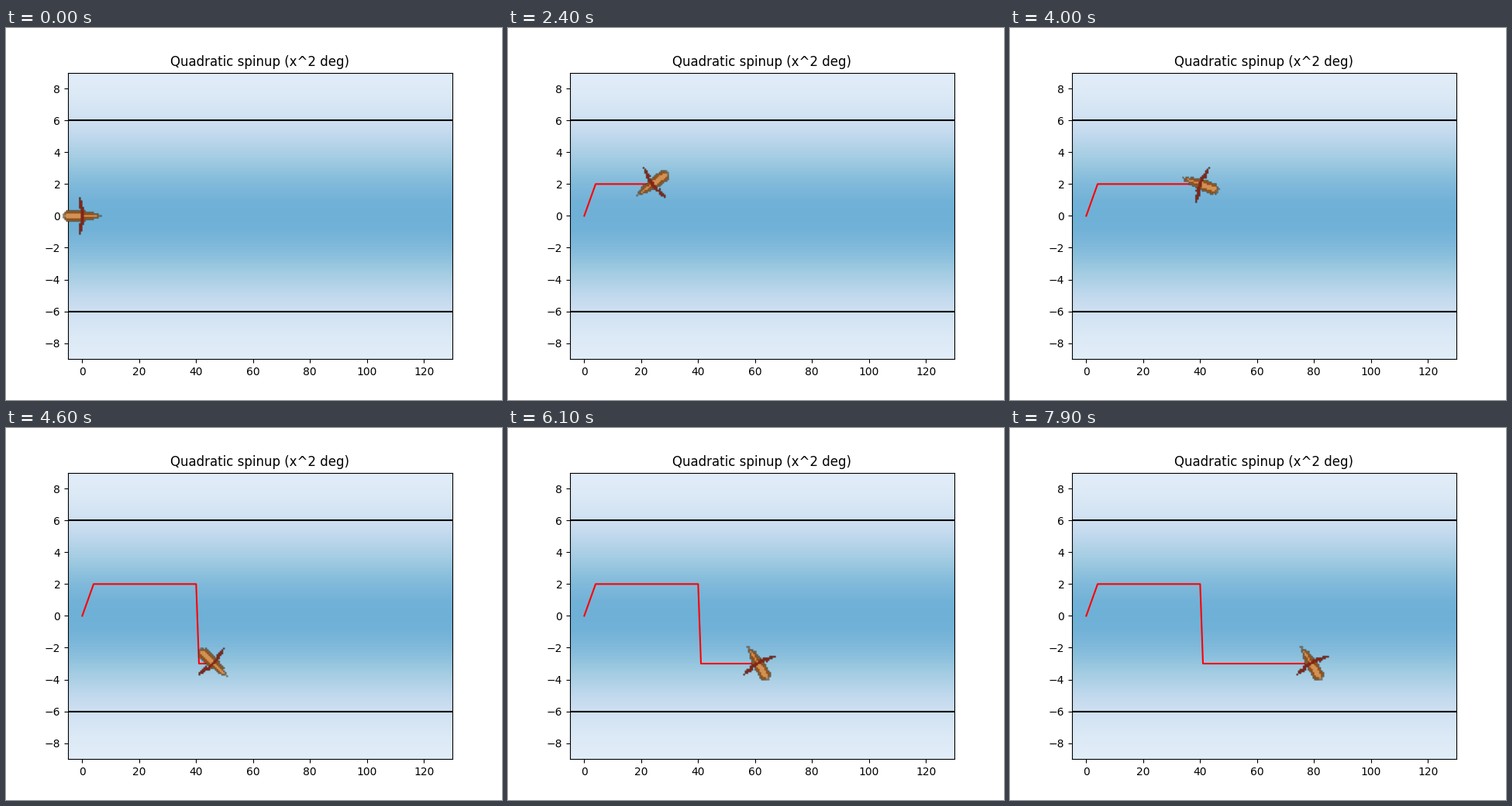
Write a matplotlib script that moves like this. It is 640 by 480 pixels and loops after 8000 ms.

```python
import numpy as np
import matplotlib.pyplot as plt
from matplotlib.animation import FuncAnimation
from matplotlib.offsetbox import AnnotationBbox, OffsetImage

FRAMES, STEP_MS = 80, 100
EDGE = (124, 92, 56)
PLANK = (146, 78, 26)
DECK = (210, 146, 84)
OAR = (128, 38, 24)


def make_boat():
    """Small pixel boat seen from above, bow to the right."""
    img = np.zeros((23, 24, 4))
    mid = 11

    def block(c0, c1, r0, r1, color, alpha=1.0):
        """Fill columns c0..c1 at distances r0..r1 either side of the keel."""
        for r in range(r0, r1 + 1):
            for row in (mid - r, mid + r):
                img[row, c0:c1 + 1, :3] = np.array(color) / 255
                img[row, c0:c1 + 1, 3] = alpha

    # hull outline
    block(0, 0, 0, 1, EDGE, 0.8)
    block(1, 1, 0, 2, EDGE)
    block(2, 13, 0, 3, EDGE)
    block(14, 18, 0, 2, EDGE)
    block(19, 21, 0, 1, EDGE)
    block(22, 23, 0, 0, EDGE, 0.8)
    # planks and deck
    block(1, 1, 0, 0, DECK)
    block(2, 13, 0, 2, PLANK)
    block(2, 10, 0, 1, DECK)
    block(14, 18, 0, 1, PLANK)
    block(13, 20, 0, 0, DECK)
    block(21, 21, 0, 0, PLANK)
    # oars
    block(10, 10, 5, 11, OAR)
    block(11, 11, 2, 9, OAR)
    block(11, 12, 0, 5, OAR)
    return img


def rotate(img, deg, shape=(31, 30)):
    """Nearest-neighbour turn, counter-clockwise, onto a larger canvas."""
    h, w = img.shape[:2]
    rows, cols = np.indices(shape)
    y = (shape[0] - 1) / 2 - rows
    x = cols - (shape[1] - 1) / 2
    c, s = np.cos(np.radians(deg)), np.sin(np.radians(deg))
    col = np.floor(x * c + y * s + w / 2 + 1e-6).astype(int)
    row = np.floor(h / 2 - (y * c - x * s) + 1e-6).astype(int)
    inside = (col >= 0) & (col < w) & (row >= 0) & (row < h)
    out = np.zeros(shape + (4,))
    out[inside] = img[row[inside], col[inside]]
    return out


def course(x):
    return np.where(x <= 40, np.minimum(x / 2, 2), -3)


fig, ax = plt.subplots(figsize=(6.4, 4.8), dpi=100)
y = np.linspace(9, -9, 400)
flow = 0.115 + 0.375 * np.cos(np.pi * y / 18) ** 2
ax.imshow(flow[:, None], cmap="Blues", vmin=0, vmax=1, aspect="auto",
          extent=(-5, 130, -9, 9))
for bank in (-6, 6):
    ax.plot([-5, 130], [bank, bank], color="black")
track, = ax.plot([], [], color="red")
ax.set(xlim=(-5, 130), ylim=(-9, 9), title="Quadratic spinup (x^2 deg)")

boat = make_boat()
sprite = OffsetImage(rotate(boat, 0), zoom=1.5)
marker = AnnotationBbox(sprite, (0, 0), frameon=False, pad=0)
ax.add_artist(marker)


def update(n):
    x = np.arange(n + 1)
    path = course(x)
    track.set_data(x, path)
    sprite.set_data(rotate(boat, n ** 2 % 360))
    marker.xy = marker.xybox = (n, float(path[-1]))
    return track, marker


anim = FuncAnimation(fig, update, frames=FRAMES, interval=STEP_MS,
                     repeat=True, repeat_delay=0, blit=False)
plt.show()
```
